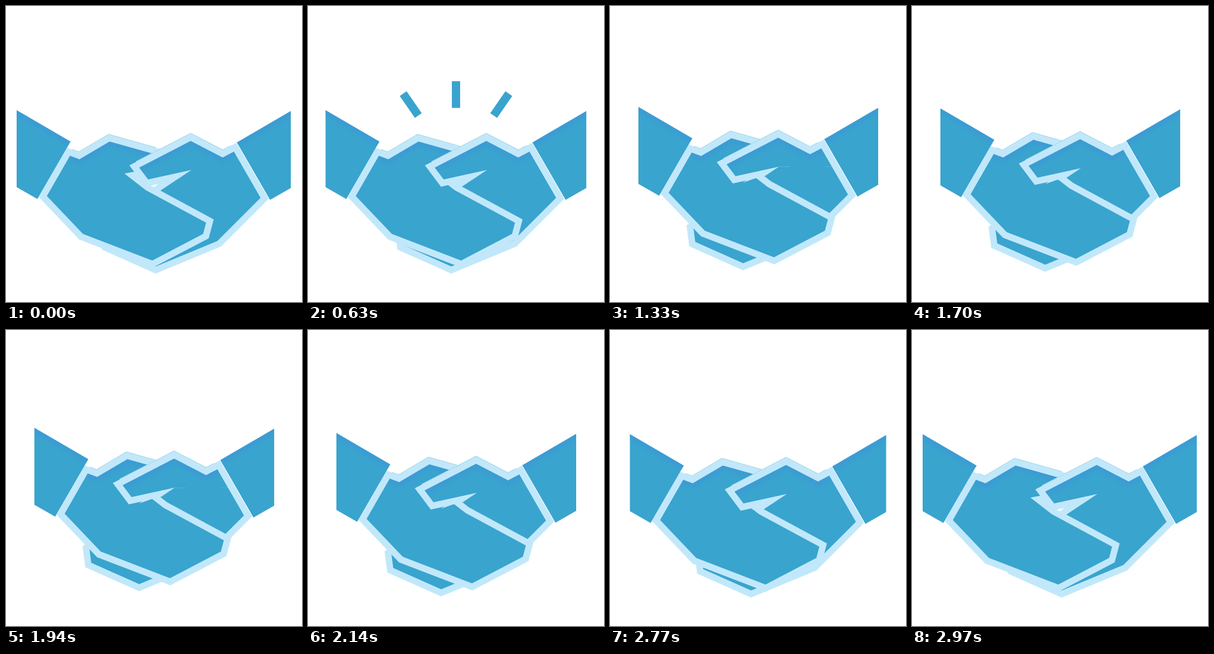
Animation of 500 by 500 pixels, one loop 3000 ms. Source, as an HTML page with a canvas:

```html
<!DOCTYPE html>
<html lang="en">
<head>
<meta charset="utf-8">
<title>Handshake</title>
<style>
html, body { margin: 0; width: 100%; height: 100%; overflow: hidden; background: #fff; }
canvas { display: block; width: 500px; height: 500px; }
</style>
</head>
<body>
<canvas id="stage" width="500" height="500"></canvas>
<script>
const ctx = document.getElementById('stage').getContext('2d');
const LOOP = 3000, BLUE = '#39a4ce', PALE = '#c1e8fa', RIM = 11;

// Corners as x, y pairs in the open pose; each hand starts with its four knuckles
const leftHand = [108,253, 124,259, 175,229, 250,250, 222,279, 200,283,
  236,311, 338,366, 333,385, 247,430, 130,385, 69,321];
const rightHand = [385,246, 366,256, 312,228, 225,273, 240,293, 313,277,
  262,311, 169,381, 172,404, 253,440, 357,397, 430,324];
const cuff = [18,176, 109,229, 53,326, 18,306];
// Part of the right hand that lies over the left one
const thumbArea = [190,200, 480,200, 480,277, 313,277, 290,293, 272,297, 236,310, 190,310];

function trace(points) {
  ctx.beginPath();
  for (let i = 0; i < points.length; i += 2) ctx.lineTo(points[i], points[i + 1]);
}

function stroke(color, width) {
  ctx.strokeStyle = color;
  ctx.lineWidth = width;
  ctx.stroke();
}

// Blue shape with a soft darker band along its first corners
function body(shape, edgeCorners) {
  ctx.save();
  trace(shape);
  ctx.fillStyle = BLUE;
  ctx.fill();
  ctx.clip();
  trace(shape.slice(0, edgeCorners * 2));
  for (const width of [22, 15, 8]) stroke('rgba(64,144,218,.16)', width);
  ctx.restore();
}

function hand(shape) {
  trace(shape.slice(0, 8));
  stroke('#a9d8e8', 2 * RIM + 2);
  trace(shape);
  ctx.closePath();
  stroke(PALE, 2 * RIM);
  body(shape, 4);
}

function at(x, y, draw) {
  ctx.save();
  ctx.translate(x, y);
  draw();
  ctx.restore();
}

const part = (t, from, to) => Math.min(1, Math.max(0, (t - from) / (to - from)));
const hump = p => Math.sin(Math.PI * p) ** 2;

function rays(t) {
  if (t < 330 || t >= 1100) return;
  const d = -36 + 206 * part(t, 330, 770);
  ctx.fillStyle = BLUE;
  for (const side of [-1, 0, 1]) {
    at(250, 277, () => {
      ctx.rotate(side * 0.605);
      ctx.fillRect(-7, -d - 45 - 7 * Math.abs(side), 14, 45);
    });
  }
}

function render(t) {
  const grip = part(t, 300, 770) ** 2.7 - part(t, 2270, 2970) ** 2.2;
  const lift = -11 * (hump(part(t, 1100, 1590) ** 1.85) + hump(part(t, 1590, 2230)));
  const lx = 30 * grip, rx = -28 * grip;
  ctx.fillStyle = '#fff';
  ctx.fillRect(0, 0, 500, 500);
  rays(t);
  at(rx, lift, () => hand(rightHand));
  at(lx, lift, () => {
    hand(leftHand);
    body(cuff, 2);
  });
  at(rx, lift, () => {
    ctx.save();
    trace(thumbArea);
    ctx.clip();
    hand(rightHand);
    ctx.restore();
    ctx.translate(499, 1.5);
    ctx.scale(-1, 1);
    body(cuff, 2);
  });
}

const start = performance.now();
function tick() {
  render((performance.now() - start) % LOOP);
  requestAnimationFrame(tick);
}
tick();
</script>
</body>
</html>
```
